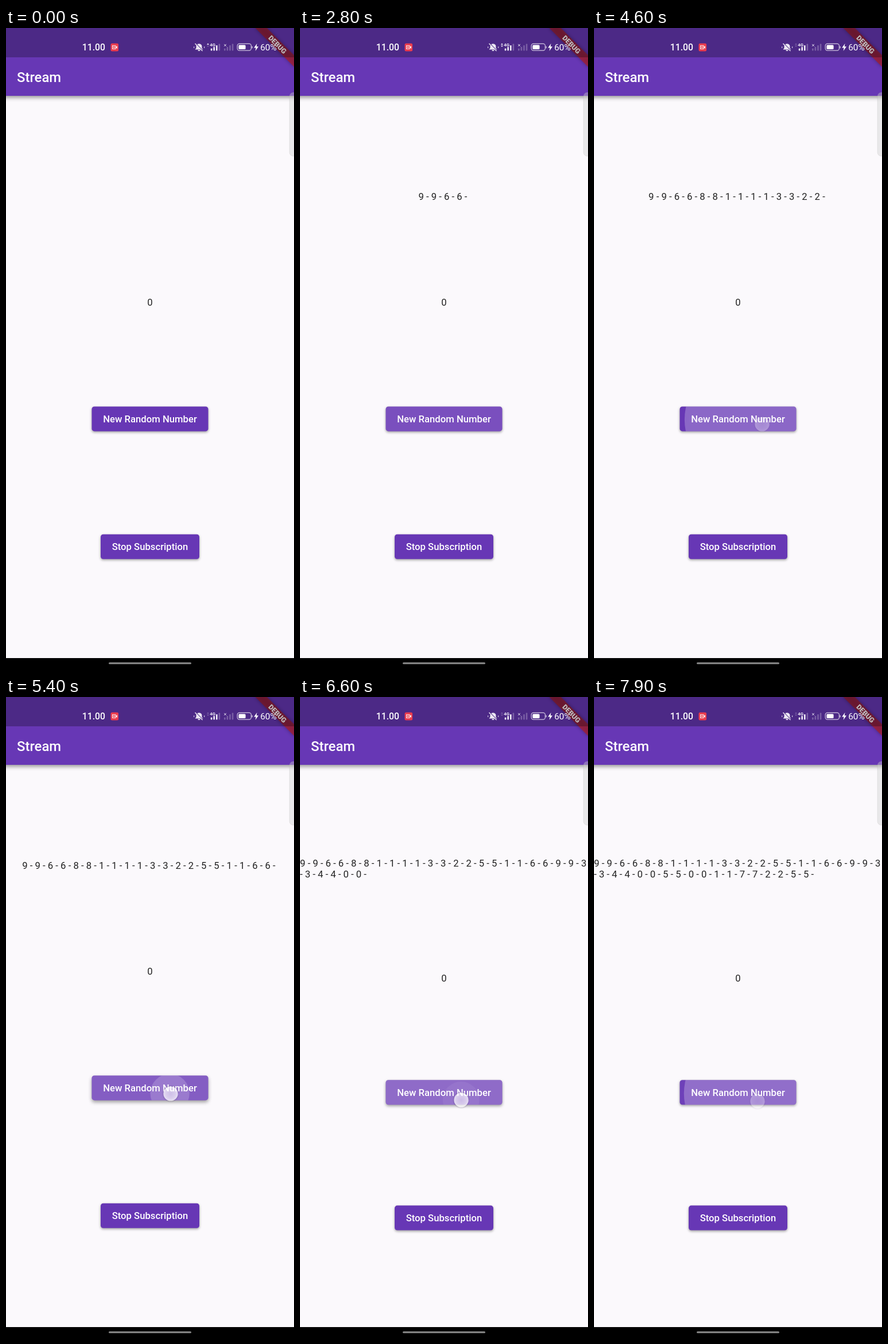
Write an HTML page with a canvas that moves like this. It is 502x1115 px and loops after 8 s.

```html
<!DOCTYPE html>
<html lang="en">
<head>
<meta charset="utf-8">
<title>Stream</title>
<style>
html, body { margin: 0; width: 100%; height: 100%; overflow: hidden; background: #fbf9fc; }
canvas { display: block; width: 502px; height: 1115px; }
</style>
</head>
<body>
<canvas id="stage"></canvas>
<script>
const W = 502, H = 1115, LOOP = 8000, STEP = 100;
const PURPLE = '#6737b5', PAPER = '#fbf9fc', INK = '#212121';
const PRESS = 75, SPLASH = 0.24, BODY = 16.7;
const canvas = document.getElementById('stage');
const dpr = window.devicePixelRatio || 1;
canvas.width = W * dpr;
canvas.height = H * dpr;
const c = canvas.getContext('2d');

// Release time of each tap and the number it emits.
const releases = [2000, 2500, 2960, 3400, 3765, 4120, 4489, 4730, 4920, 5108,
  5420, 5745, 6070, 6390, 6655, 6880, 7105, 7330, 7555, 7789];
const digits = '96811325169340501725';
// Finger path: tap index, x, y.
const path = [[0, 298, 679], [4, 297, 682], [6, 293, 689], [10, 287, 690], [14, 281, 701], [19, 285, 703]];

const clamp = v => Math.max(0, Math.min(1, v));
const mix = (a, b, k) => a + (b - a) * k;

function finger(i) {
  let k = 1;
  while (path[k][0] < i) k++;
  const [a, b] = [path[k - 1], path[k]];
  const f = (i - a[0]) / (b[0] - a[0]);
  return { x: mix(a[1], b[1], f), y: mix(a[2], b[2], f) };
}

const taps = releases.map((up, i) => ({ up, down: up - PRESS, ...finger(i) }));

// cubic-bezier(.25, .1, .25, 1)
function ease(x) {
  const bez = (p, q, s) => 3 * p * s * (1 - s) ** 2 + 3 * q * s * s * (1 - s) + s ** 3;
  let lo = 0, hi = 1;
  for (let i = 0; i < 18; i++) {
    const m = (lo + hi) / 2;
    if (bez(0.25, 0.25, m) < x) lo = m; else hi = m;
  }
  return bez(0.1, 1, lo);
}

function box(x, y, w, h, r, fill) {
  c.fillStyle = fill;
  c.beginPath();
  c.roundRect(x, y, w, h, r);
  c.fill();
}

function disc(x, y, r, fill) {
  c.fillStyle = fill;
  c.beginPath();
  c.arc(x, y, r, 0, Math.PI * 2);
  c.fill();
}

function poly(fill, ...p) {
  c.fillStyle = fill;
  c.beginPath();
  for (let i = 0; i < p.length; i += 2) c.lineTo(p[i], p[i + 1]);
  c.fill();
}

function text(s, x, y, size, color, weight = 400, align = 'left') {
  c.font = `${weight} ${size}px Roboto, sans-serif`;
  c.textAlign = align;
  c.fillStyle = color;
  c.fillText(s, x, y);
}

function shadow(color, blur, dy) {
  c.shadowColor = color;
  c.shadowBlur = blur * dpr;
  c.shadowOffsetY = dy * dpr;
}

function banner() {
  const s = BODY / 14;
  c.save();
  c.translate(W, 0);
  c.rotate(Math.PI / 4);
  c.scale(s, s);
  shadow('rgba(0,0,0,.5)', 6, 0);
  c.fillStyle = 'rgba(183,28,28,.63)';
  c.fillRect(-40, 28, 80, 12);
  shadow('transparent', 0, 0);
  text('DEBUG', 0, 37.7, 10.2, '#fff', 900, 'center');
  c.restore();
}

function bell() {
  c.fillStyle = '#ece8f3';
  c.beginPath();
  c.moveTo(329.5, 37.5);
  c.lineTo(331.5, 35);
  c.lineTo(331.5, 32);
  c.bezierCurveTo(331.5, 26, 341.5, 26, 341.5, 32);
  c.lineTo(341.5, 35);
  c.lineTo(343.5, 37.5);
  c.fill();
  box(334.5, 38.2, 4, 1.8, 1, '#ece8f3');
  for (const [color, dx, w] of [['#4c2a87', 1.3, 1.5], ['#ece8f3', 0, 1.4]]) {
    c.strokeStyle = color;
    c.lineWidth = w;
    c.beginPath();
    c.moveTo(329.5 + dx, 27);
    c.lineTo(342.5 + dx, 40);
    c.stroke();
  }
  for (const x of [327, 345]) box(x, 32, 1.3, 3, 0.6, '#c8bcdc');
}

function bars(x, lit) {
  for (let i = 0; i < 4; i++) {
    const h = 4 + i * 2.7;
    box(x + i * 4.6, 39.5 - h, 2.6, h, 1, i < lit ? '#f1edf7' : 'rgba(255,255,255,.25)');
  }
}

function statusBar(t) {
  c.fillStyle = 'rgba(0,0,0,.26)';
  c.fillRect(0, 0, W, 51);
  text('11.00', 132.8, 39.2, 15.7, '#fff', 500);

  box(182.5, 26.8, 13.6, 13.6, 2.5, '#ea3b4d');
  c.strokeStyle = '#fff';
  c.lineWidth = 1;
  c.strokeRect(185.5, 30.8, 5.5, 5.5);
  poly('#fff', 191, 33.5, 193.8, 31, 193.8, 36);
  disc(188.2, 33.5, 1.1, '#fff');

  bell();

  const dim = 'rgba(255,255,255,.25)', on = '#f1edf7';
  const busy = t < 4000;
  poly(busy ? on : dim, 350, 29, 352, 26.4, 354, 29);
  poly(busy && t >= 800 ? on : dim, 350, 30.5, 352, 33, 354, 30.5);
  bars(356.8, 3);
  c.fillStyle = '#4c2a87';
  c.fillRect(355, 25, 10, 8);
  text('4G', 355.2, 32.3, 7.8, on, 700);
  bars(380, 0);
  c.strokeStyle = '#d6cde4';
  c.lineWidth = 1;
  c.beginPath();
  c.moveTo(380, 28); c.lineTo(384, 32);
  c.moveTo(384, 28); c.lineTo(380, 32);
  c.stroke();

  c.strokeStyle = '#cfc5df';
  c.lineWidth = 1.2;
  c.beginPath();
  c.roundRect(403.2, 27.4, 24.2, 11.8, 3.6);
  c.stroke();
  box(405.4, 29.5, 12.2, 7.6, 1.6, '#fff');
  box(428.4, 31.4, 1.4, 4, 0.7, '#cfc5df');
  poly('#fff', 437.5, 27, 432.2, 34.6, 435.6, 34.6, 434.6, 40, 440, 32.2, 436.6, 32.2);
  text('60%', 443.2, 39.2, 15.4, '#fff', 400);
}

function appBar(t) {
  c.save();
  shadow('rgba(0,0,0,.42)', 7, 3);
  c.fillStyle = PURPLE;
  c.fillRect(-10, -10, W + 20, 128);
  c.restore();
  text('Stream', 19, 94, 23.9, '#fff', 500);
  box(494, 112, 16, 111, 7, 'rgba(205,205,205,.4)');
  c.strokeStyle = 'rgba(150,150,150,.16)';
  c.lineWidth = 1;
  c.beginPath();
  c.roundRect(494, 112, 16, 111, 7);
  c.stroke();
  banner();
  statusBar(t);
}

function splash(tap, t, cx, cy, dy) {
  if (t < tap.down || t > tap.up + 375) return;
  const held = Math.min(t, tap.up) - tap.down;
  const since = Math.max(0, t - tap.up);
  const e = ease(clamp(held / 1000 + since / 225));
  const alpha = SPLASH * clamp((t - tap.down) / 75) * (1 - clamp((since - 225) / 150));
  const half = Math.hypot(203, 43) / 2;
  disc(mix(tap.x, cx, e), mix(tap.y + dy, cy, e), mix(half * 0.3, half + 6, e),
    `rgba(255,255,255,${alpha})`);
}

function pressed(t) {
  return Math.max(...taps.map(p => t < p.down ? 0
    : clamp((Math.min(t, p.up) - p.down - Math.max(0, t - p.up)) / 200)));
}

function button(label, y, w, h, t = -1) {
  const x = W / 2 - w / 2;
  const press = t < 0 ? 0 : pressed(t);
  const lift = clamp(press * 2.5);
  c.save();
  shadow('rgba(0,0,0,.38)', 4 + 4 * lift, 1.8 + 2.4 * lift);
  box(x, y, w, h, 4.5, PURPLE);
  c.restore();
  if (t >= 0) {
    c.save();
    c.beginPath();
    c.roundRect(x, y, w, h, 4.5);
    c.clip();
    c.fillStyle = `rgba(255,255,255,${SPLASH * press})`;
    c.fillRect(x, y, w, h);
    for (const tap of taps) splash(tap, t, W / 2, y + h / 2, 0);
    c.restore();
  }
  text(label, W / 2, y + h / 2 + 6.1, BODY, '#fff', 500, 'center');
}

function touch(tap, t) {
  const alpha = t < tap.down - 45 ? 0 : 1 - clamp((t - tap.up) / 190);
  if (!alpha) return;
  c.save();
  c.globalAlpha = alpha;
  const { x, y } = tap;
  const halo = c.createRadialGradient(x, y, 12, x, y, 15.5);
  halo.addColorStop(0, 'rgba(60,40,90,.22)');
  halo.addColorStop(1, 'rgba(60,40,90,0)');
  c.beginPath();
  c.arc(x, y, 15.5, 0, 7);
  c.arc(x, y, 12.4, 0, 7, true);
  c.fillStyle = halo;
  c.fill('evenodd');
  const glow = c.createRadialGradient(x, y, 0, x, y, 12.6);
  glow.addColorStop(0, 'rgba(255,255,255,.52)');
  glow.addColorStop(0.6, 'rgba(255,255,255,.62)');
  glow.addColorStop(1, 'rgba(255,255,255,.76)');
  disc(x, y, 12.6, glow);
  c.restore();
}

function numbers(count) {
  const list = [...digits.slice(0, count)].flatMap(d => [d, d]);
  if (count < 12) {
    text(list.map(d => d + ' - ').join(''), W / 2, 299, BODY, INK, 400, 'center');
    return;
  }
  text(list.slice(0, 23).join(' - '), 0, 295, BODY, INK);
  text('- ' + list.slice(23).join(' - ') + ' -', 0, 314, BODY, INK);
}

function draw(t) {
  c.setTransform(dpr, 0, 0, dpr, 0, 0);
  c.fillStyle = PAPER;
  c.fillRect(0, 0, W, H);
  appBar(t);

  const count = releases.filter(up => up <= t).length;
  const wrapped = count >= 12;
  if (count) numbers(count);
  text('0', W / 2, wrapped ? 494.7 : 483, BODY, INK, 400, 'center');
  button('New Random Number', wrapped ? 666.2 : 658.4, 203, 43, t);
  button('Stop Subscription', wrapped ? 884.6 : 880.8, 172, 43);
  for (const tap of taps) touch(tap, t);

  c.fillStyle = '#000';
  c.fillRect(0, 1096, W, 19);
  box(179, 1103.4, 144, 3.2, 1.6, '#8c8c8c');
}

function tick(now) {
  draw(Math.floor(now % LOOP / STEP) * STEP);
  requestAnimationFrame(tick);
}
draw(0);
requestAnimationFrame(tick);
</script>
</body>
</html>
```
